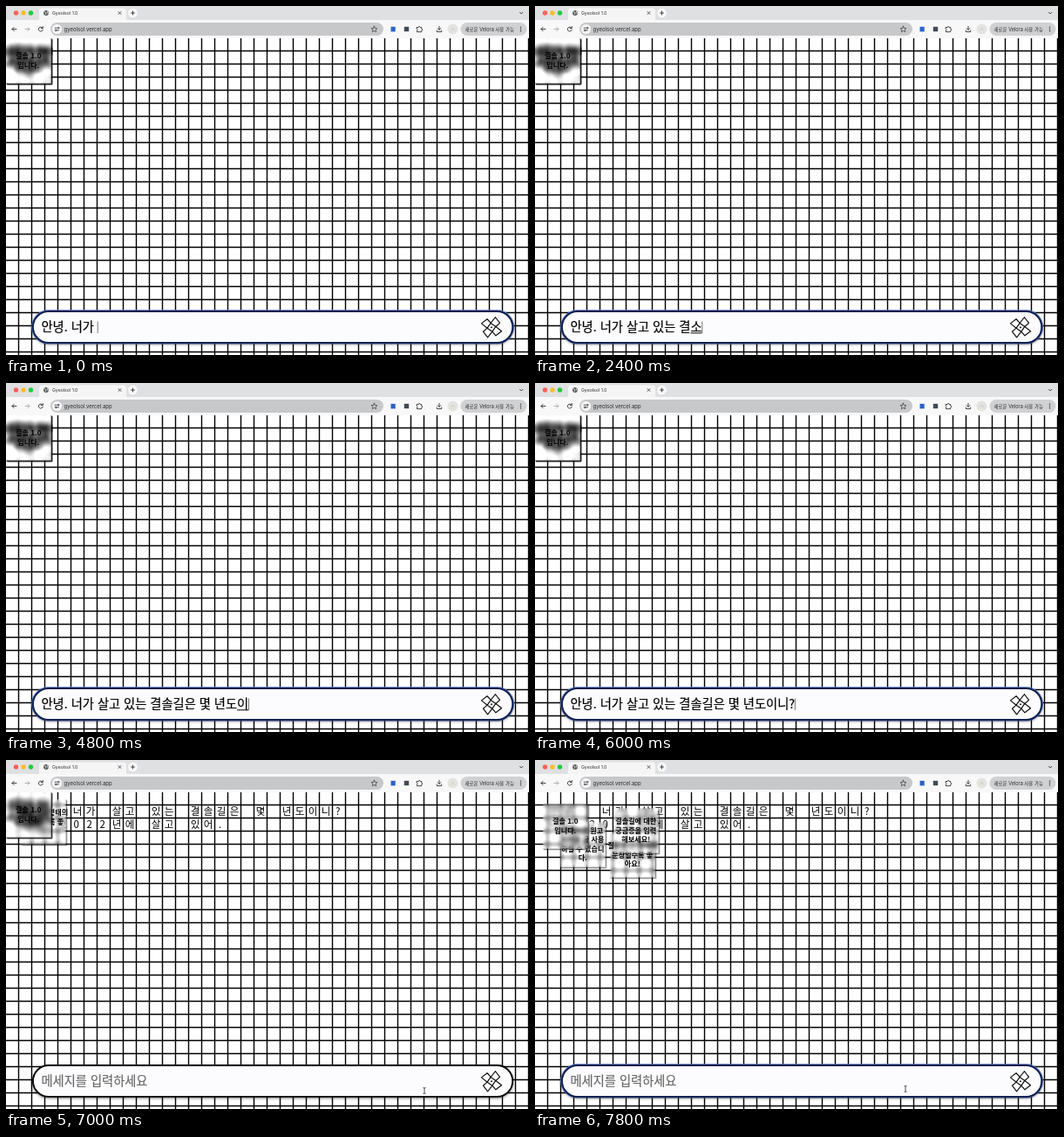
Animation, 600 px wide and 400 px high, one loop 8 s. Source, as an HTML page:

```html
<!DOCTYPE html>
<html lang="ko">
<head>
<meta charset="utf-8">
<title>Gyeolsol 1.0</title>
<style>
  html, body { margin: 0; width: 100%; height: 100%; overflow: hidden; background: #fff; }
  #stage { position: relative; width: 600px; height: 400px; overflow: hidden; }
  svg { position: absolute; left: 0; top: 0; display: block; }
  text { font-family: "Noto Sans CJK KR", "Noto Sans CJK", sans-serif; white-space: pre; }
  .ui { font-family: Inter, "Noto Sans CJK KR", "Noto Sans CJK", sans-serif; fill: #2b2b2d; }
  .cell { font-size: 11.5px; font-weight: 500; text-anchor: middle; }
  .line { fill: none; stroke: #333; stroke-linecap: round; stroke-linejoin: round; }
  .field { font-size: 14.25px; font-weight: 500; }
  #typed { stroke: #000; stroke-width: .2; }
  #hint { fill: #666; stroke: #666; stroke-width: .15; }
  #bar { filter: drop-shadow(0 1.5px 1.5px rgba(0, 0, 0, .5)); }
  #page { position: absolute; left: 0; top: 37px; width: 600px; height: 363px; overflow: hidden; }
  .note {
    position: absolute; left: 0; top: 0; width: 51.5px; height: 51.5px;
    display: flex; align-items: center; justify-content: center;
    font: bold 8.1px/10.4px "Noto Sans CJK KR", "Noto Sans CJK", sans-serif;
    text-align: center; white-space: pre; color: #000;
    backdrop-filter: blur(2.2px) contrast(1.2);
    box-shadow: 1px 1px 1.2px rgba(0, 0, 0, .55), inset -1px -1px 1px rgba(0, 0, 0, .18);
  }
</style>
</head>
<body>
<div id="stage">
  <svg width="600" height="400" viewBox="0 0 600 400">
    <path id="grid" stroke="#000" stroke-width="1.4"/>
    <g id="question"></g>
    <g id="answer"></g>

    <!-- browser window -->
    <rect width="600" height="17" fill="#dfe0e2"/>
    <path d="M35 17Q38 17 38 14V6Q38 2.500 41.500 2.500H134.500Q138 2.500 138 6V14Q138 17 141 17Z" fill="#f5f5f6"/>
    <rect y="16" width="600" height="21" fill="#f8f8f9"/>
    <circle cx="11.500" cy="8" r="2.700" fill="#ff5f57"/>
    <circle cx="20" cy="8" r="2.700" fill="#febc2e"/>
    <circle cx="28.500" cy="8" r="2.700" fill="#28c840"/>
    <circle cx="46" cy="8" r="2.900" fill="#55585c"/>
    <path d="M44 6.500L46 7.500L45.500 9.500M47.500 6L48 8.500" class="line" style="stroke:#eee" stroke-width=".8"/>
    <text x="53" y="10" class="ui" font-size="5.200">Gyeolsol 1.0</text>
    <path d="M129 6.500l3 3m0-3l-3 3" class="line" stroke-width=".8"/>
    <circle cx="145.500" cy="8" r="5.300" fill="#fafafa"/>
    <path d="M143.500 8h4m-2-2v4" class="line" stroke-width=".9"/>
    <path d="M589.500 7.300l1.700 1.700l1.700-1.700" class="line" stroke-width=".9"/>
    <path d="M12 26.500H7m2.200-2.200L7 26.500l2.200 2.200" class="line" stroke-width=".9"/>
    <path d="M22 26.500h5m-2.200-2.200l2.200 2.200l-2.200 2.200" class="line" style="stroke:#aaa" stroke-width=".9"/>
    <path d="M42 25.200A2.500 2.500 0 1 0 42.300 27.300M42.300 23.500V25.500H40.300" class="line" stroke-width=".9"/>
    <rect x="51" y="19" width="382" height="15" rx="7.500" fill="#c7c8ca"/>
    <circle cx="58.500" cy="26.500" r="5.500" fill="#f7f7f8"/>
    <path d="M56 25.200h2.300M60.500 27.900h-2.300" class="line" stroke-width=".8"/>
    <circle cx="60" cy="25.200" r=".9" class="line" stroke-width=".7"/>
    <circle cx="57" cy="27.900" r=".9" class="line" stroke-width=".7"/>
    <text x="66.500" y="28.700" class="ui" font-size="6">gyeolsol.vercel.app</text>
    <path d="M422.500 23.200l1 2.200l2.400.300l-1.800 1.600l.5 2.400l-2.100-1.200l-2.100 1.200l.5-2.400l-1.800-1.600l2.400-.300z" class="line" stroke-width=".7"/>
    <rect x="441.500" y="23.800" width="5.200" height="5.600" fill="#2c62c8"/>
    <rect x="456.800" y="23.800" width="5.400" height="5.400" fill="#3f4a55"/>
    <path d="M471.500 24.500h1.700a1 1 0 0 1 2 0h1.500v1.700a1 1 0 0 1 0 2v1.500h-5.200v-1.700a1 1 0 0 0 0-1.800z" class="line" stroke-width=".9"/>
    <path d="M497 23.300v4m-1.800-1.700l1.800 1.800l1.800-1.800M494.300 28v1.600h5.400V28" class="line" stroke-width=".9"/>
    <circle cx="512.500" cy="26.500" r="6" fill="#e3e3e0"/>
    <path d="M510.500 28l2-2.800l2 2.800" class="line" style="stroke:#c5c5c2" stroke-width=".7"/>
    <rect x="521.500" y="19" width="76" height="15" rx="7.500" fill="#d0d1d3"/>
    <text x="526.500" y="28.600" class="ui" font-size="5.500">새로운 Velora 사용 가능</text>
    <g fill="#333"><circle cx="590.500" cy="24.200" r=".75"/><circle cx="590.500" cy="26.500" r=".75"/><circle cx="590.500" cy="28.800" r=".75"/></g>

    <!-- message bar -->
    <rect id="halo" x="29.800" y="348.800" width="552.600" height="38" rx="19" fill="none" stroke="#5f82d8" stroke-width="1.200"/>
    <rect id="bar" x="31" y="350" width="550.200" height="35.800" rx="17.900" fill="#fcfcfe" stroke-width="1.800"/>
    <text id="hint" class="field" x="40.500" y="373.200">메세지를 입력하세요</text>
    <text id="typed" class="field" x="40.500" y="373.200"></text>
    <path id="under" stroke="#000" stroke-width="1"/>
    <path id="caret" stroke="#555" stroke-width=".8"/>
    <g id="wheel" fill="#fff" stroke="#111" stroke-width="1.200" stroke-linejoin="round"></g>
    <path id="hand" d="M-1-4.500q1-.9 1.600.3l.7 2.700l2.700.7q1 .4.800 1.600l-.7 2.700h-4.300l-2.300-3q-.2-1 .8-.8l1.100.8z" fill="#fff" stroke="#222" stroke-width=".7"/>
    <path id="beam" d="M-1.500-3.500q1.500 0 1.500 1v5q0 1-1.500 1M1.500-3.500q-1.500 0-1.500 1M0 2.500q0 1 1.500 1" fill="none" stroke="#222" stroke-width=".8"/>
  </svg>
  <div id="page"></div>
</div>
<script>
const LOOP = 8000, TICK = 200;
const SENT = 6400, REPLY = 7000, FOCUS = 7200;
const $ = id => document.getElementById(id);
const show = (el, on) => { el.style.display = on ? "" : "none"; };

// [time, text so far]; a trailing Hangul syllable is still being composed
const keys = [
  [0, "안녕. 너가 "], [200, "ㅅ"], [400, "사"], [800, "살"], [1000, "살고"],
  [1200, "살고 이"], [1400, "살고 있"], [1600, "살고 있느"], [1800, "살고 있는"],
  [2000, "살고 있는 ㄱ"], [2200, "살고 있는 결"], [2400, "살고 있는 결소"],
  [2600, "살고 있는 결솔"], [2800, "살고 있는 결솔기"], [3000, "살고 있는 결솔길"],
  [3200, "살고 있는 결솔길으"], [3400, "살고 있는 결솔길은"],
  [3600, "살고 있는 결솔길은 ㅁ"], [3800, "살고 있는 결솔길은 며"],
  [4000, "살고 있는 결솔길은 몇"], [4200, "살고 있는 결솔길은 몇 "],
  [4400, "살고 있는 결솔길은 몇 년"], [4600, "살고 있는 결솔길은 몇 년도"],
  [4800, "살고 있는 결솔길은 몇 년도이"], [5000, "살고 있는 결솔길은 몇 년도이니"],
  [5200, "살고 있는 결솔길은 몇 년도이니?"]
].map(([at, s], i) => [at, i ? "안녕. 너가 " + s : s]);

// bottom to top; path points are [time, x, y]
const notes = [
  { text: "질문은 긴 형태의\n문장일수록 좋\n아요!", path: [[6800, 0, 0], [7400, 50, 25], [7800, 85.5, 46]] },
  { text: "이백자로 원고\n지처럼 글 사용\n하실 수 있습니\n다.", path: [[7000, 0, 0], [7400, 20, 24.5], [7800, 29, 33.5]] },
  { text: "결솔길에 대한\n궁금증을 입력\n해보세요!", path: [[7000, 0, 0], [7400, 25.5, 4], [7800, 90, 17.5]] },
  { text: "결솔 1.0\n입니다.", path: [[7400, 0, 0], [7800, 9, 12.5]] }
];

function along(path, t) {
  if (t <= path[0][0]) return path[0].slice(1);
  for (let i = 1; i < path.length; i++) {
    const [a, x, y] = path[i - 1], [b, u, v] = path[i];
    if (t <= b) {
      const k = (t - a) / (b - a);
      return [x + (u - x) * k, y + (v - y) * k];
    }
  }
  return path[path.length - 1].slice(1);
}

function fillCells(group, string, y) {
  [...string].forEach((ch, i) => {
    if (ch === " ") return;
    const el = document.createElementNS("http://www.w3.org/2000/svg", "text");
    el.setAttribute("class", "cell");
    el.setAttribute("x", 22 + 15 * i - (ch < "가" ? 1.3 : 0));
    el.setAttribute("y", y);
    el.textContent = ch;
    group.append(el);
  });
}

function build() {
  let d = "";
  for (let x = 14.5; x < 600; x += 15) d += `M${x} 37V400`;
  for (let y = 51.5; y < 400; y += 15) d += `M0 ${y}H600`;
  $("grid").setAttribute("d", d);
  fillCells($("question"), "안녕. 너가 살고 있는 결솔길은 몇 년도이니?", 63.3);
  fillCells($("answer"), "나는 2022년에 살고 있어.", 78.3);
  $("wheel").innerHTML = [0, 90, 180, 270].map(a =>
    `<path transform="rotate(${a})" d="M-3.500-3.500L-3-12L5-9.500L3.500-3.500Z"/>`).join("") +
    '<circle r="1" fill="#111" stroke="none"/>';
  for (const n of notes) {
    n.el = document.createElement("div");
    n.el.className = "note";
    n.el.textContent = n.text;
    $("page").append(n.el);
  }
}

function drawField(t) {
  const sent = t >= SENT, focused = !sent || t >= FOCUS;
  const text = sent ? "" : keys.filter(k => k[0] <= t).pop()[1];
  const typed = $("typed"), n = text.length;
  typed.textContent = text;
  show($("hint"), sent);
  const end = 40.5 + (n ? typed.getComputedTextLength() : 0);
  const composing = n > 0 && text[n - 1] >= "ㄱ" && t > 0;
  show($("under"), composing);
  if (composing) {
    const from = 40.5 + typed.getSubStringLength(0, n - 1);
    $("under").setAttribute("d", `M${from} 374.8H${end}`);
  }
  $("caret").setAttribute("d", `M${end + .3} 361.500V375`);
  show($("caret"), focused && t < 7600);
  show($("halo"), focused);
  $("bar").setAttribute("stroke", focused ? "#0c1c4c" : "#000");
}

function drawPointer(t) {
  const hover = t >= 6200 && t < 7000;
  const [bx, by] = along([[7000, 480, 379], [7200, 425, 377]], t);
  show($("hand"), hover);
  show($("beam"), t >= 7000);
  $("hand").setAttribute("transform", "translate(549 381)");
  $("beam").setAttribute("transform", `translate(${bx} ${by})`);
  const spin = 35 + 90 * Math.min(1, Math.max(0, (t - 6200) / 780));
  $("wheel").setAttribute("transform", `translate(557 368.300) rotate(${spin})`);
}

function draw(ms) {
  const t = Math.floor((ms % LOOP) / TICK) * TICK;
  drawField(t);
  drawPointer(t);
  show($("question"), t >= SENT);
  show($("answer"), t >= REPLY);
  for (const n of notes) {
    const [x, y] = along(n.path, t);
    n.el.style.left = x + "px";
    n.el.style.top = y + "px";
  }
}

build();
const start = performance.now();
(function frame() {
  draw(performance.now() - start);
  requestAnimationFrame(frame);
})();
</script>
</body>
</html>
```
